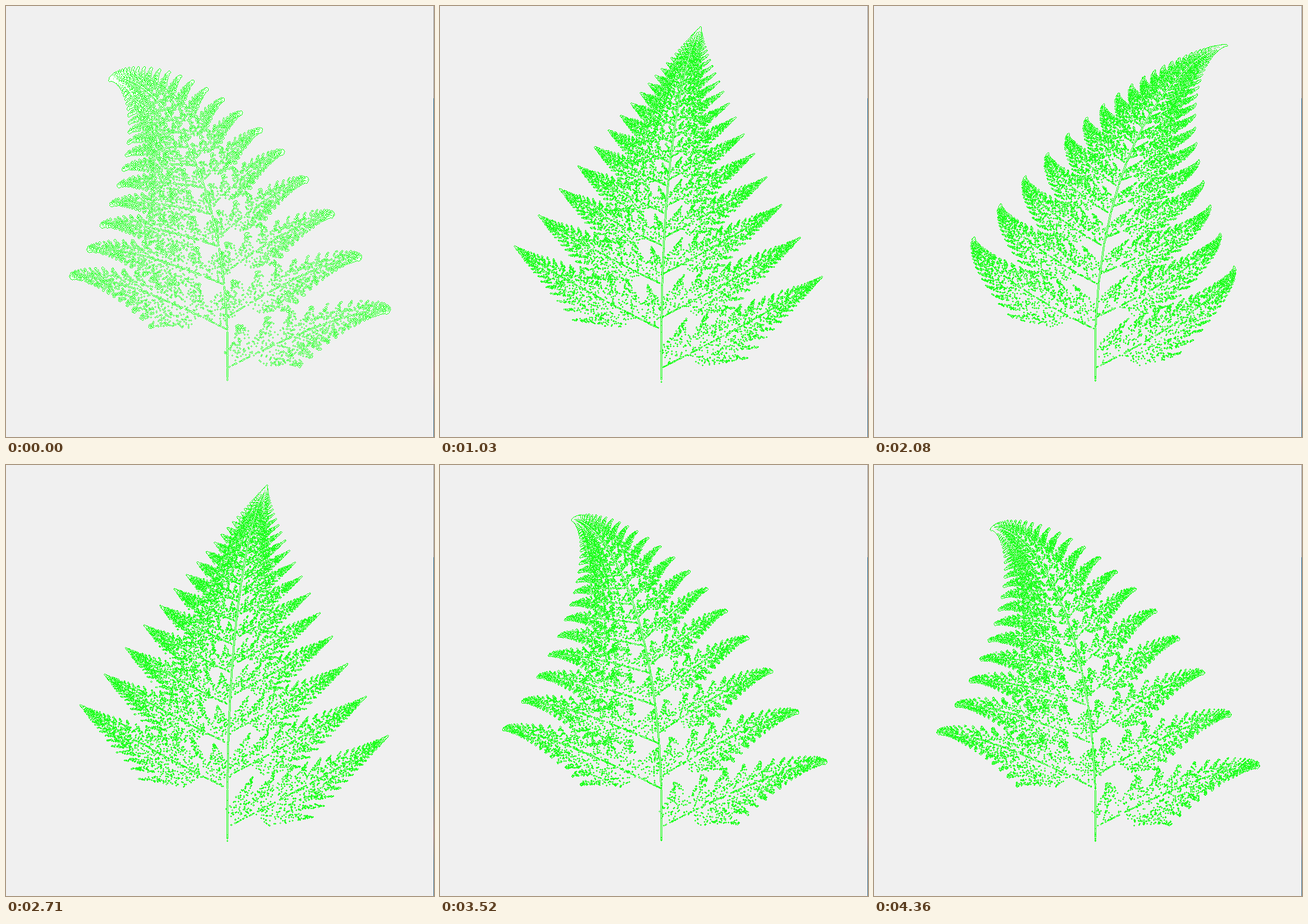
These frames come from a looping animation (695 px wide and 701 px high, 4480 ms). An HTML page with a canvas:

```html
<!DOCTYPE html>
<html>
<head>
<meta charset="utf-8">
<title>Swaying fern</title>
<style>
html, body { margin: 0; height: 100%; overflow: hidden; background: #f0f0f0; }
canvas { display: block; }
</style>
</head>
<body>
<canvas id="stage" width="695" height="701"></canvas>
<script>
const W = 695, H = 701, LOOP = 4480, STEPS = 38, POINTS = 26000;
const BASE_X = 359, BASE_Y = 612, SCALE_X = 90, SCALE_Y = 53.8;
const ctx = document.getElementById('stage').getContext('2d');

// Little-endian ABGR colours
const GREY = 0xfff0f0f0, GREEN = 0xff20ff20, WHITE = 0xffffffff;

// Every pose lasts 120 ms except these
const unevenHolds = { 0: 100, 4: 90, 10: 90, 15: 150, 16: 90, 20: 150,
  21: 90, 22: 150, 23: 90, 24: 150, 25: 90 };
const starts = [0];
for (let i = 0; i < STEPS - 1; i++) starts.push(starts[i] + (unevenHolds[i] || 120));

// The bend sweeps between -0.045 and 0.045 in steps of 0.005
function bendAt(step) {
  const phase = (step + 2) % 36;
  return 0.005 * ((phase <= 18 ? phase : 36 - phase) - 9);
}

function randomFrom(seed) {
  return () => {
    seed = (seed + 0x6d2b79f5) | 0;
    let t = Math.imul(seed ^ (seed >>> 15), 1 | seed);
    t = (t + Math.imul(t ^ (t >>> 7), 61 | t)) ^ t;
    return ((t ^ (t >>> 14)) >>> 0) / 4294967296;
  };
}

// Chaos game: counts how often the fern visits each pixel
function growFern(bend, seed) {
  const visits = new Uint16Array(W * H), random = randomFrom(seed);
  const droop = 0.04 - 2 * bend;
  let x = 0, y = 0;
  for (let i = 0; i < POINTS; i++) {
    const r = random();
    if (r < 0.02) [x, y] = [0, 0.16 * y];
    else if (r < 0.86) [x, y] = [0.85 * x + bend * y, droop * x + 0.85 * y + 1.6];
    else if (r < 0.93) [x, y] = [0.2 * x - 0.26 * y, 0.23 * x + 0.22 * y + 1.6];
    else [x, y] = [-0.15 * x + 0.28 * y, 0.26 * x + 0.24 * y + 0.44];
    const px = Math.round(BASE_X + SCALE_X * x), py = Math.round(BASE_Y - SCALE_Y * y);
    visits[py * W + px]++;
  }
  return visits;
}

function drawEdge() {
  ctx.fillStyle = '#a0a0a0';
  ctx.fillRect(W - 1, 0, 1, 150);
  const tint = ctx.createLinearGradient(0, 150, 0, H);
  tint.addColorStop(0, '#2f6f95');
  tint.addColorStop(0.7, '#4a7690');
  tint.addColorStop(0.82, '#a07878');
  tint.addColorStop(0.9, '#4a7690');
  ctx.fillStyle = tint;
  ctx.fillRect(W - 1, 150, 1, H - 150);
}

// Green dots whose centres are cleared where visits pile up
function draw(step) {
  const visits = growFern(bendAt(step), step + 1);
  const image = ctx.createImageData(W, H);
  const pixels = new Uint32Array(image.data.buffer).fill(GREY);
  const [limit, hollow] = step === 0 ? [1, WHITE] : [2, GREY];

  visits.forEach((count, p) => {
    if (count) for (const d of [0, -1, 1, -W, W]) pixels[p + d] = GREEN;
  });
  visits.forEach((count, p) => {
    if (count >= limit) pixels[p] = hollow;
  });
  ctx.putImageData(image, 0, 0);
  drawEdge();
}

let shown = -1;
function tick() {
  const time = performance.now() % LOOP;
  const step = starts.findLastIndex(start => start <= time);
  if (step !== shown) draw(shown = step);
  requestAnimationFrame(tick);
}
tick();
</script>
</body>
</html>
```
